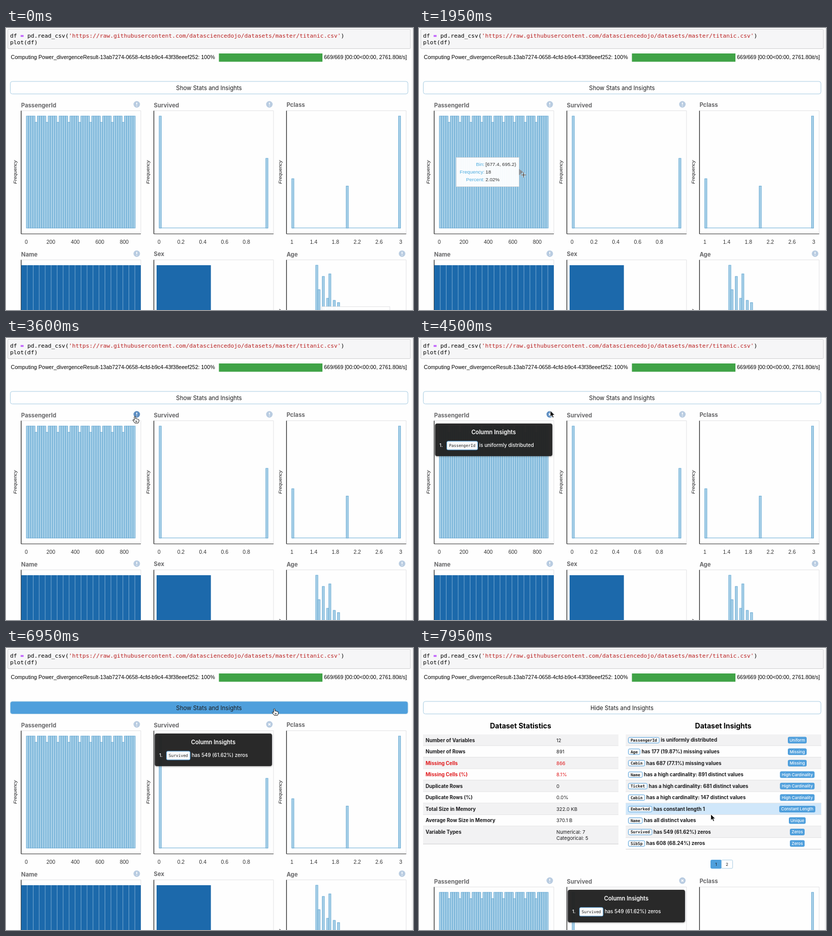
Write an HTML page that moves like this. It is 800 by 554 pixels and loops after 8000 ms.

```html
<!DOCTYPE html>
<html lang="en">
<head>
<meta charset="utf-8">
<title>Data overview</title>
<style>
html, body { margin: 0; width: 100%; height: 100%; overflow: hidden; background: #fefefe; }
svg { display: block; width: 800px; height: 554px; font-family: Inter, sans-serif; fill: #1c1c1e; }
text { white-space: pre; }
.code { font: 11.25px "DejaVu Sans Mono", monospace; fill: #000; }
.chip { font: 7.85px "DejaVu Sans Mono", monospace; fill: #222; }
.helv { font-family: "Liberation Sans", Arial, sans-serif; }
.bold, #stats .chip { font-weight: 700; }
.semi { font-weight: 600; }
.medium { font-weight: 500; }
.mid { text-anchor: middle; }
.end { text-anchor: end; }
.bar { fill: #a8d0e8; stroke: #559fce; stroke-width: .8; }
.off { display: none; }
</style>
</head>
<body>
<svg id="stage" viewBox="0 0 800 554"></svg>
<script>
const LOOP = 8000, STEP = 50, SHIFT = 307;
const BLUE = '#4f9fdc', PALE = '#a9cde3', CHIP = 4.73;
const BIN = 4.28, BASE = 393, TALL = 220;
const COLS = [29.8, 290.6, 551.4];

const text = (x, y, s, size, cls = '', fill = '') =>
  `<text x="${x}" y="${y}" class="${cls}" style="font-size:${size}px;${fill && 'fill:' + fill}">${s}</text>`;
const rect = (x, y, w, h, fill, extra = '') =>
  `<rect x="${x}" y="${y}" width="${w}" height="${h}" fill="${fill}" ${extra}/>`;
const line = (x1, y1, x2, y2, stroke, w = 1) =>
  `<path d="M${x1} ${y1}L${x2} ${y2}" stroke="${stroke}" stroke-width="${w}"/>`;
const bar = (x, top, base = BASE, w = BIN) =>
  `<rect class="bar" x="${x}" y="${top}" width="${w}" height="${base - top}"/>`;
const range = (n, fn) => Array.from({ length: n }, (_, i) => fn(i)).join('');

function chip(x, mid, name, h) {
  const w = name.length * CHIP + 8.7;
  return {
    end: x + w + 3,
    svg: rect(x, mid - h / 2, w, h, '#fafafa', `rx="2.5" stroke="${BLUE}"`) +
      `<text class="chip" x="${x + 4.4}" y="${mid + 2.8}">${name}</text>`
  };
}

function icon(id, x, y) {
  return `<g id="${id}"><circle cx="${x}" cy="${y}" r="6.4" fill="#b9cce1"/>
    <path class="bang" d="M${x} ${y - 3.6}v4.2M${x} ${y + 2.4}v1.3" stroke="#fff" stroke-width="1.7"/>
    <path class="cross off" d="M${x - 2} ${y - 2}l4 4m0 -4l-4 4" stroke="#fff" stroke-width="1.6"/></g>`;
}

function frame(x, y) {
  return `<path d="M${x} ${y}h235.2v242" fill="none" stroke="#e2e2e4"/>` +
    line(x, y, x, y + 242, '#222', 1.3) + line(x, y + 242, x + 235.2, y + 242, '#333', 1.2);
}

const title = (col, y, s) => text(COLS[col], y, s, 11.3, 'bold', '#68686a');
const ticks = (x, step, labels) =>
  labels.map((s, i) => text(x + i * step, 424, s, 10.4, 'helv mid', '#333')).join('');
const freq = (x, y) =>
  `<text class="helv mid" font-size="9.8" font-style="italic" transform="translate(${x} ${y}) rotate(-90)">Frequency</text>`;
const count = i => i % 5 === 4 && i < 49 ? 17 : 18;

function popup(id, x, name, rest) {
  const c = chip(x + 23, 211.3, name, 17);
  return `<g id="${id}" class="off">` +
    rect(x, 168, 230.5, 64, '#232225', 'rx="4" fill-opacity=".95" filter="url(#shade)"') +
    text(x + 115, 189.3, 'Column Insights', 11.2, 'semi mid', '#fff') +
    text(x + 8.5, 214.3, '1.', 9.6, 'medium', '#fff') + c.svg +
    text(c.end, 214.3, rest, 9.75, 'medium', '#fff') + '</g>';
}

function charts() {
  const flat = x => line(x, 392.8, x + 50 * BIN, 392.8, '#68abd5', 1);
  const age = [[0, 466], [1, 514], [3, 488], [5, 531], [6, 483], [8, 535], [10, 539.5]];
  return COLS.map(x => frame(x, 162.5) + frame(x, 455.5)).join('') +
    COLS.map(x => freq(x - 9, 283)).join('') + freq(COLS[2] - 9, 575.5) +
    title(0, 155.8, 'PassengerId') + title(1, 155.8, 'Survived') + title(2, 155.2, 'Pclass') +
    title(0, 449, 'Name') + title(1, 448.3, 'Sex') + title(2, 449, 'Age') +
    range(50, i => bar(40 + i * BIN, BASE - TALL * count(i) / 18)) +
    flat(301) + bar(301, 173) + bar(301 + 49 * BIN, 256) +
    flat(561.7) + bar(561.7, 296) + bar(561.7 + 25 * BIN, 310.5) + bar(561.7 + 49 * BIN, 173) +
    ticks(40, 48.1, [0, 200, 400, 600, 800]) +
    ticks(301, 42.9, ['0', '0.2', '0.4', '0.6', '0.8']) +
    ticks(562, 42.8, ['1', '1.4', '1.8', '2.2', '2.6', '3']) +
    rect(30, 466, 235, 230, '#1c69ab') + range(19, i => line(41.75 + i * 11.75, 466, 41.75 + i * 11.75, 600, '#8fb9da', .8)) +
    rect(296, 466, 106.7, 230, '#1c69ab') +
    age.map(([i, top]) => bar(608.8 + i * BIN, top, 690)).join('') +
    icon('iconA', 257, 150) + icon('iconB', 517.7, 150) + icon('iconName', 257, 443.3) + icon('iconAge', 778.5, 443.3) +
    popup('popA', 31.6, 'PassengerId', 'is uniformly distributed') +
    popup('popB', 292.4, 'Survived', 'has 549 (61.62%) zeros') +
    `<g id="ageTip">${rect(620.5, 547.5, 134, 58, '#fff', 'fill-opacity=".93" stroke="#e2e2e4"')}</g>`;
}

const STATS = [
  ['Number of Variables', '12'], ['Number of Rows', '891'], ['Missing Cells', '866'],
  ['Missing Cells (%)', '8.1%'], ['Duplicate Rows', '0'], ['Duplicate Rows (%)', '0.0%'],
  ['Total Size in Memory', '322.0 KB'], ['Average Row Size in Memory', '370.1 B'],
  ['Variable Types', 'Numerical: 7']
];
const INSIGHTS = [
  ['PassengerId', 'is uniformly distributed', 'Uniform'],
  ['Age', 'has 177 (19.87%) missing values', 'Missing'],
  ['Cabin', 'has 687 (77.1%) missing values', 'Missing'],
  ['Name', 'has a high cardinality: 891 distinct values', 'High Cardinality'],
  ['Ticket', 'has a high cardinality: 681 distinct values', 'High Cardinality'],
  ['Cabin', 'has a high cardinality: 147 distinct values', 'High Cardinality'],
  ['Embarked', 'has constant length 1', 'Constant Length'],
  ['Name', 'has all distinct values', 'Unique'],
  ['Survived', 'has 549 (61.62%) zeros', 'Zeros'],
  ['SibSp', 'has 608 (68.24%) zeros', 'Zeros']
];
const BADGE = { Uniform: 37, Missing: 37, 'High Cardinality': 68, 'Constant Length': 71, Unique: 33, Zeros: 29 };
const ROW = 22.55, TOP = 169.7;

const stripe = (cls, i, x, h = ROW) =>
  rect(x, TOP + i * ROW, 384, h, i % 2 ? '#fefefe' : '#f2f2f3', `class="${cls}"`) +
  line(x, TOP + i * ROW + h, x + 384, TOP + i * ROW + h, '#c9c9cb', .9);

function stats() {
  const left = STATS.map(([label, value], i) => {
    const y = TOP + i * ROW + 14.8, color = label.startsWith('Missing') ? '#e0191c' : '#1c1c1e';
    return stripe('left', i, 8, i === 8 ? 35 : ROW) +
      text(13, y, label, 9.7, 'bold', color) + text(270, y, value, 9.5, '', color);
  }).join('') + text(270, 376.8, 'Categorical: 5', 9.5);
  const right = INSIGHTS.map(([name, rest, badge], i) => {
    const mid = TOP + (i + .5) * ROW, c = chip(411.5, mid + .2, name, 11), w = BADGE[badge];
    return stripe('right', i, 406.5) + c.svg + text(c.end, mid + 3.5, rest, 9.75, 'bold') +
      rect(743.5 - w / 2, mid - 6.4, w, 13, BLUE, 'rx="3"') +
      text(743.5, mid + 3, badge, 8, 'mid medium', '#fff');
  }).join('');
  return `<g id="stats" class="off">` +
    text(199.7, 158, 'Dataset Statistics', 14, 'bold mid', '#000') +
    text(598, 158, 'Dataset Insights', 14, 'bold mid', '#000') + left + right +
    rect(573.5, 416.5, 21, 16.5, BLUE, `rx="2" stroke="${BLUE}"`) + text(584, 428, '1', 8, 'mid') +
    rect(594.5, 416.5, 22, 16.5, '#fff', `rx="2" stroke="${PALE}"`) + text(605.5, 428, '2', 8, 'mid') + '</g>';
}

const header =
  rect(3.5, 2.5, 791.5, 38, '#f6f6f7', 'rx="1.5" stroke="#cfcfd1"') +
  line(798.5, 0, 798.5, 554, '#e3e3e5') +
  `<text class="code" x="8" y="19">df <tspan fill="#a2f" font-weight="bold">=</tspan> pd.read_csv(<tspan fill="#ba2121">'https://raw.githubusercontent.com/datasciencedojo/datasets/master/titanic.csv'</tspan>)</text>
   <text class="code" x="8" y="32.3">plot(df)</text>` +
  text(9.5, 61.3, 'Computing Power_divergenceResult-13ab7274-0658-4cfd-b9c4-43f38eeef252: 100%', 10.6, 'helv', '#000') +
  rect(418.5, 50, 203.5, 16.3, '#40a347') +
  text(625, 61.3, '669/669 [00:00&lt;00:00, 2761.80it/s]', 10.53, 'helv', '#000') +
  rect(8.5, 105, 781.5, 24.5, '#fff', `id="button" rx="4" stroke="${PALE}"`) +
  `<text id="caption" class="mid" x="399" y="122" font-size="11.45"></text>`;

const tip = `<g id="tip" class="off"><rect id="tipBox" y="254.5" height="57" fill="#fff" fill-opacity=".94" stroke="#dcdcde"/>
  <path d="M0 277l8 6l-8 6z" fill="#8b8f94"/><g id="tipText"></g></g>`;

const cursors = `<g id="cursor">
  <g class="plus"><path d="M-5 0H5M0 -5V5" stroke="#fff" stroke-width="2.6"/><path d="M-5 0H5M0 -5V5" stroke="#222" stroke-width="1.1"/></g>
  <path class="arrow" d="M0 0V12.2L2.8 9.6L4.8 14L7 13L5.1 8.8H9Z" fill="#111" stroke="#fff" stroke-width=".9"/>
  <path class="hand" d="M-1.3 .6Q0 -1 1.3 .6V4.4Q2.8 3.6 3.6 4.9Q5 4.2 5.7 5.5Q7.6 5 7.7 7V9.5L6.3 12.8H-.2L-4 7.6Q-4.4 5.8 -2.6 6.3L-1.3 7.5Z M1.6 8v3M3.6 8v3" fill="#fff" stroke="#111" stroke-width="1"/>
</g>`;

document.getElementById('stage').innerHTML =
  `<defs><filter id="shade" x="-10%" y="-20%" width="120%" height="150%"><feDropShadow dx="0" dy="1" stdDeviation="1.5" flood-opacity=".4"/></filter></defs>` +
  header + stats() + `<g id="charts">${charts()}</g>` + tip + cursors;

const $ = id => document.getElementById(id);
const show = (el, on) => el.classList.toggle('off', !on);
const within = (v, a, b) => v >= a && v <= b;

// time, x, y of the pointer
const PATH = [
  [0, 612, 590], [500, 598, 585], [950, 440, 556], [1300, 262, 430], [1550, 212, 325],
  [1800, 205.5, 289], [2050, 205.5, 288.5], [2500, 213, 245], [2800, 215.4, 221], [3100, 222, 196],
  [3700, 256, 151], [4200, 257, 149], [4450, 258, 142.6], [4600, 258, 142.8], [4800, 257, 149],
  [5000, 300, 149], [5400, 514, 152], [5600, 517.5, 152.5], [6150, 518, 152], [6600, 526, 125],
  [6950, 527.5, 119.5], [7350, 528, 119], [7650, 548, 215], [7900, 573.5, 325], [8000, 573.5, 328]
];
const EVENTS = { openA: 4000, closeA: 4800, openB: 5500, expand: 7350 };

function pointer(t) {
  const i = PATH.findIndex((p, n) => n && p[0] > t);
  const [t0, x0, y0] = PATH[i - 1], [t1, x1, y1] = PATH[i];
  const k = (t - t0) / (t1 - t0), e = k * k * (3 - 2 * k);
  return [x0 + (x1 - x0) * e, y0 + (y1 - y0) * e];
}

function setIcon(id, open, hover) {
  const el = $(id);
  el.firstElementChild.setAttribute('fill', hover ? '#5f8fc2' : '#b9cce1');
  show(el.querySelector('.bang'), !open);
  show(el.querySelector('.cross'), open);
}

function setTip(x, y) {
  const i = Math.floor((x - 40) / BIN), on = within(i, 0, 49) && within(y, BASE - TALL * count(i) / 18, BASE);
  show($('tip'), on);
  if (!on) return;
  const edge = n => +(1 + n * 17.8).toFixed(1);
  const bin = `[${edge(i)}, ${edge(i + 1)})`, vx = -6.5 - bin.length * 4.25, w = 57.5 - vx;
  $('tip').setAttribute('transform', `translate(${40 + (i + .5) * BIN - 8} 0)`);
  $('tipBox').setAttribute('x', -w);
  $('tipBox').setAttribute('width', w);
  const rows = [['Bin:', bin], ['Frequency:', count(i)], ['Percent:', (count(i) / 8.91).toFixed(2) + '%']];
  $('tipText').innerHTML = rows.map(([label, value], n) =>
    text(vx - 2, 271 + n * 15.2, label, 9.75, 'helv end', '#4fade0') +
    text(vx, 271 + n * 15.2, value, 9.75, 'helv', '#333')).join('');
}

function draw(t) {
  const [x, y] = pointer(t);
  const expanded = t >= EVENTS.expand;
  const openA = within(t, EVENTS.openA, EVENTS.closeA - 1), openB = t >= EVENTS.openB;
  const near = (cx, r) => !expanded && Math.hypot(x - cx, y - 150) < r;
  const onButton = within(x, 8, 790) && within(y, 105, 129.5);
  const onPlot = !expanded && COLS.some(c => within(x, c, c + 235)) && (within(y, 162, 404) || y > 455);
  const onIcon = near(257, 6.9) || near(517.7, 6.9);

  $('charts').setAttribute('transform', `translate(0 ${expanded ? SHIFT : 0})`);
  show($('stats'), expanded);
  $('caption').textContent = (expanded ? 'Hide' : 'Show') + ' Stats and Insights';
  $('button').setAttribute('fill', onButton ? BLUE : '#fff');
  show($('ageTip'), t < 350);
  show($('popA'), openA);
  show($('popB'), openB);
  setIcon('iconA', openA, near(257, 9));
  setIcon('iconB', openB, near(517.7, 9));
  setTip(x, expanded ? 0 : y);

  const hot = Math.floor((y - TOP) / ROW);
  document.querySelectorAll('.right').forEach((el, i) =>
    el.setAttribute('fill', expanded && i === hot ? '#d0e7fa' : i % 2 ? '#fefefe' : '#f2f2f3'));

  const kind = onIcon || onButton ? 'hand' : onPlot ? 'plus' : 'arrow';
  $('cursor').setAttribute('transform', `translate(${x.toFixed(1)} ${y.toFixed(1)})`);
  for (const el of $('cursor').children) show(el, el.classList.contains(kind));
}

const start = performance.now();
function tick() {
  const t = (performance.now() - start) % LOOP;
  draw(Math.floor(t / STEP) * STEP);
  requestAnimationFrame(tick);
}
tick();
</script>
</body>
</html>
```
